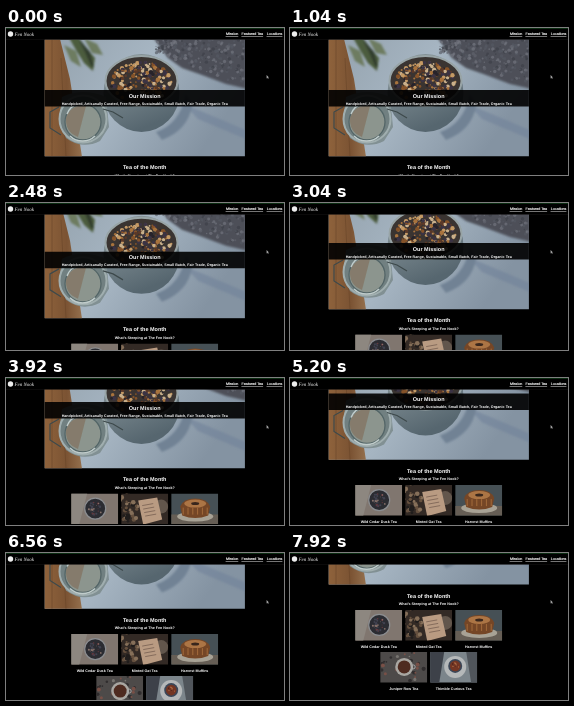
These frames come from a looping animation (278x147 px, 8000 ms). An HTML page:

```html
<!DOCTYPE html>
<html lang="en">
<head>
<meta charset="utf-8">
<title>Tea shop</title>
<style>
html, body { margin: 0; height: 100%; overflow: hidden; background: #000; }
svg { display: block; }
#stage { width: 100vw; height: 100vh; }
text { font: bold 3.67px "Liberation Sans", Arial, sans-serif; fill: #fff; text-rendering: geometricPrecision; }
.mid { text-anchor: middle; }
.big { font-size: 5.5px; }
.nav text { font-weight: normal; text-decoration: underline; stroke: #fff; stroke-width: .15px; }
.brand { font: italic 5px "Liberation Serif", serif; }
</style>
</head>
<body>
<svg id="stage" viewBox="0 0 278 147">
  <defs>
    <linearGradient id="cloth" x2="1" y2=".4">
      <stop offset="0" stop-color="#93a1ac"/>
      <stop offset=".5" stop-color="#a6b5c2"/>
      <stop offset="1" stop-color="#8493a2"/>
    </linearGradient>
    <linearGradient id="wood" x2="1">
      <stop offset="0" stop-color="#8f633c"/>
      <stop offset=".6" stop-color="#7b5333"/>
      <stop offset="1" stop-color="#94704e"/>
    </linearGradient>
    <linearGradient id="bowl" x2=".4" y2="1">
      <stop offset="0" stop-color="#8b989b"/>
      <stop offset=".6" stop-color="#6f7e85"/>
      <stop offset="1" stop-color="#56666f"/>
    </linearGradient>
    <filter id="soft" x="-20%" y="-20%" width="140%" height="140%"><feGaussianBlur stdDeviation="1.2"/></filter>
  </defs>
  <g id="page">
    <svg x="38.7" y="11.6" width="200.2" height="116.7" viewBox="38.7 11.6 200.2 116.7">
      <path fill="url(#cloth)" d="M38 11h202v118H38z"/>
      <path fill="url(#wood)" d="M38 11h16l10 40 12 78H38z"/>
      <path stroke="#694629" stroke-width=".6" d="M46 11v118M55 30l5 99"/>
      <g filter="url(#soft)">
        <path fill="#4d5059" d="M146 8h96v53l-22-5-24-9-20-7-14-10z"/>
        <path fill="#72839a" d="M178 76l64 27v9l-50-21z" opacity=".6"/>
        <path fill="#718294" d="M150 104q24-8 30-38l6 12q-4 24-30 34z"/>
        <path fill="#4b5b3c" d="M62 8l10 1 8 11 9 10-2 13-9-8-8-13z"/>
        <path fill="#6d7c60" d="M58 17l12 6 5 16-10-6zM78 10l13 6 6 11-11-2z"/>
        <path fill="#303d2d" d="M72 10l12 14 4 15-3-1-6-14z"/>
      </g>
      <g id="knit"></g>
      <ellipse cx="135.5" cy="65" rx="38" ry="39" fill="url(#bowl)"/>
      <ellipse cx="135.5" cy="53" rx="36" ry="25" fill="#3a3431" stroke="#98a4a6" stroke-width="2"/>
      <g id="mix"></g>
      <g fill="none">
        <path fill="#819093" d="M56 69q21-10 44 0l3 30-9 14q-18 9-34-3l-7-18z"/>
        <circle cx="77" cy="91" r="23.5" fill="#718081" stroke="#a0aeaf" stroke-width="2"/>
        <circle cx="77" cy="94" r="18" fill="#8c958e" stroke="#536567" stroke-width="1.3"/>
        <path fill="#816c55" d="M60 90q5-14 20-12l-8 31q-13-5-12-19z" opacity=".6"/>
        <path stroke="#c0cccb" stroke-width="1.5" d="M61 86a18 18 0 0 1 27-8M64 108a18 18 0 0 0 25 0"/>
        <path stroke="#3d494b" stroke-width="1.2" d="M53 79l-9 5v16l11 7M97 81l10 3 10 6"/>
      </g>
    </svg>
    <path d="M38.7 62h200.2v16.5H38.7z" opacity=".9"/>
    <text class="mid big" x="138.7" y="69.5">Our Mission</text>
    <text class="mid" x="138.7" y="76.6">Handpicked, Artisanally Curated, Free Range, Sustainable, Small Batch, Fair Trade, Organic Tea</text>
    <text class="mid big" x="138.7" y="141.4">Tea of the Month</text>
    <text class="mid" x="138.7" y="148.8">What's Steeping at The Fen Nook?</text>
    <g id="cards"></g>
  </g>
  <path d="M0 0h278v11.6H0z"/>
  <path fill="#0a2c11" d="M0 0h278v1H0z"/>
  <path fill="#2c2a29" d="M0 11.2h278v.4H0z"/>
  <circle cx="4.5" cy="6" r="2.7" fill="#eee"/>
  <text class="brand" x="8.5" y="7.7">Fen Nook</text>
  <g class="nav">
    <text x="219.9" y="7.4">Mission</text>
    <text x="235.6" y="7.4">Featured Tea</text>
    <text x="260.8" y="7.4">Locations</text>
  </g>
  <path fill="#aaa" d="M260.6 47v3.4l.8-.7.6 1.2.6-.3-.6-1.2h1z"/>
</svg>
<script>
const $ = id => document.getElementById(id);
let seed = 7;
const rnd = () => (seed = seed * 16807 % 2147483647) / 2147483647;
const pick = list => list[Math.floor(rnd() * list.length)];
const many = (n, make) => Array.from({ length: n }, (_, i) => make(i)).join("");
const disc = (x, y, r, fill, more = "") => `<circle cx="${x}" cy="${y}" r="${r}" fill="${fill}" ${more}/>`;
const shape = (d, fill) => `<path d="${d}" fill="${fill}"/>`;

// Points spread evenly over an ellipse
const scatter = (n, cx, cy, rx, ry, size, colours) => many(n, () => {
  const a = rnd() * 2 * Math.PI, r = Math.sqrt(rnd());
  return disc(cx + r * rx * Math.cos(a), cy + r * ry * Math.sin(a), size * (0.5 + rnd()), pick(colours));
});

$("mix").innerHTML = scatter(210, 135.5, 54, 31, 20, 1.5,
  ["#a8733d", "#c49a65", "#5b3928", "#27232a", "#3b3344", "#c9b08b", "#855329"]);
// Woollen texture in the top right corner
$("knit").innerHTML = many(230, () => {
  const x = 150 + rnd() * 89, y = 11 + rnd() * (14 + (x - 150) * 0.38);
  return disc(x, y, 0.6 + rnd() * 1.3, pick(["#3c3f48", "#62656d", "#555963", "#747780"]), 'opacity=".65"');
});

// Each photo is drawn in a 47 by 30.5 box
const photos = [
  () => shape("M0 0h47v31H0z", "#80766f") + shape("M0 0h16L8 31H0z", "#8d8780") +
    disc(24, 15, 10.5, "#2b2c32", 'stroke="#8b8d90" stroke-width="1.2"') +
    scatter(30, 24, 15, 7, 7, 0.8, ["#66383d", "#857069", "#414250"]),
  () => shape("M0 0h47v31H0z", "#332a25") + scatter(35, 8, 14, 10, 16, 1.7, ["#65503e", "#201d1c", "#856f59"]) +
    disc(40, 13, 7, "#62564c") + shape("M17 7l19-3 5 22-19 5z", "#b99b82") +
    many(4, i => `<path d="M${21 + i} ${12 + i * 3.5}l11-2" stroke="#624c42" stroke-width=".6"/>`),
  () => shape("M0 0h47v31H0z", "#465055") + shape("M0 21h47v10H0z", "#665e55") +
    `<ellipse cx="24" cy="23" rx="18" ry="5" fill="#a8a295"/>` +
    shape("M9 13q3-8 15-8t15 8l-2 9q-13 5-26 0z", "#754626") +
    `<ellipse cx="24" cy="10" rx="11" ry="4" fill="#ac7545"/><ellipse cx="24" cy="10" rx="4" ry="1.5" fill="#39261c"/>` +
    many(6, i => `<path d="M${12 + i * 4.8} 14v7" stroke="#a36b3b"/>`),
  () => shape("M0 0h47v31H0z", "#4d4a49") + scatter(32, 24, 15, 23, 16, 1.4, ["#302d2e", "#777470", "#785047"]) +
    disc(24, 15, 9, "#a9a7a2") + disc(24, 15, 6.5, "#4e2b20") + disc(33, 15, 2, "none", 'stroke="#aaa"'),
  () => shape("M0 0h47v31H0z", "#7c858b") + shape("M0 0h14l-5 31H0z", "#3d4149") + shape("M36 0h11v31H41z", "#50555b") +
    disc(25, 15, 11, "#b5b8b9") + disc(25, 14, 7, "#3b4657") + disc(25, 14, 5.3, "#733523") +
    scatter(10, 25, 14, 4, 4, 0.7, ["#ab6a43", "#4a211b"])
];
const teas = ["Wild Cedar Dusk Tea", "Minted Oat Tea", "Harvest Muffins", "Juniper Row Tea", "Thimble Curious Tea"];
$("cards").innerHTML = many(5, i => {
  const x = i < 3 ? 65.2 + i * 50 : 90.2 + (i - 3) * 50, y = i < 3 ? 153.6 : 195.6;
  return `<svg x="${x}" y="${y}" width="47" height="30.5">${photos[i]()}</svg>
    <text class="mid" x="${x + 23.5}" y="${y + 37.8}">${teas[i]}</text>`;
});

// Scroll offset over time: [ms, px]
const stops = [[0, 0], [1600, 0], [1840, 3], [3040, 22], [3920, 38], [5200, 46.5], [6560, 72.5], [7920, 96.7]];
function scrollAt(t) {
  const i = Math.max(1, stops.findIndex(s => s[0] >= t));
  const [t0, y0] = stops[i - 1], [t1, y1] = stops[i];
  return y0 + (y1 - y0) * (t - t0) / (t1 - t0);
}
function draw() {
  const t = Math.floor(performance.now() % 8000 / 80) * 80;
  $("page").setAttribute("transform", `translate(0 ${-scrollAt(t)})`);
  requestAnimationFrame(draw);
}
draw();
</script>
</body>
</html>
```
